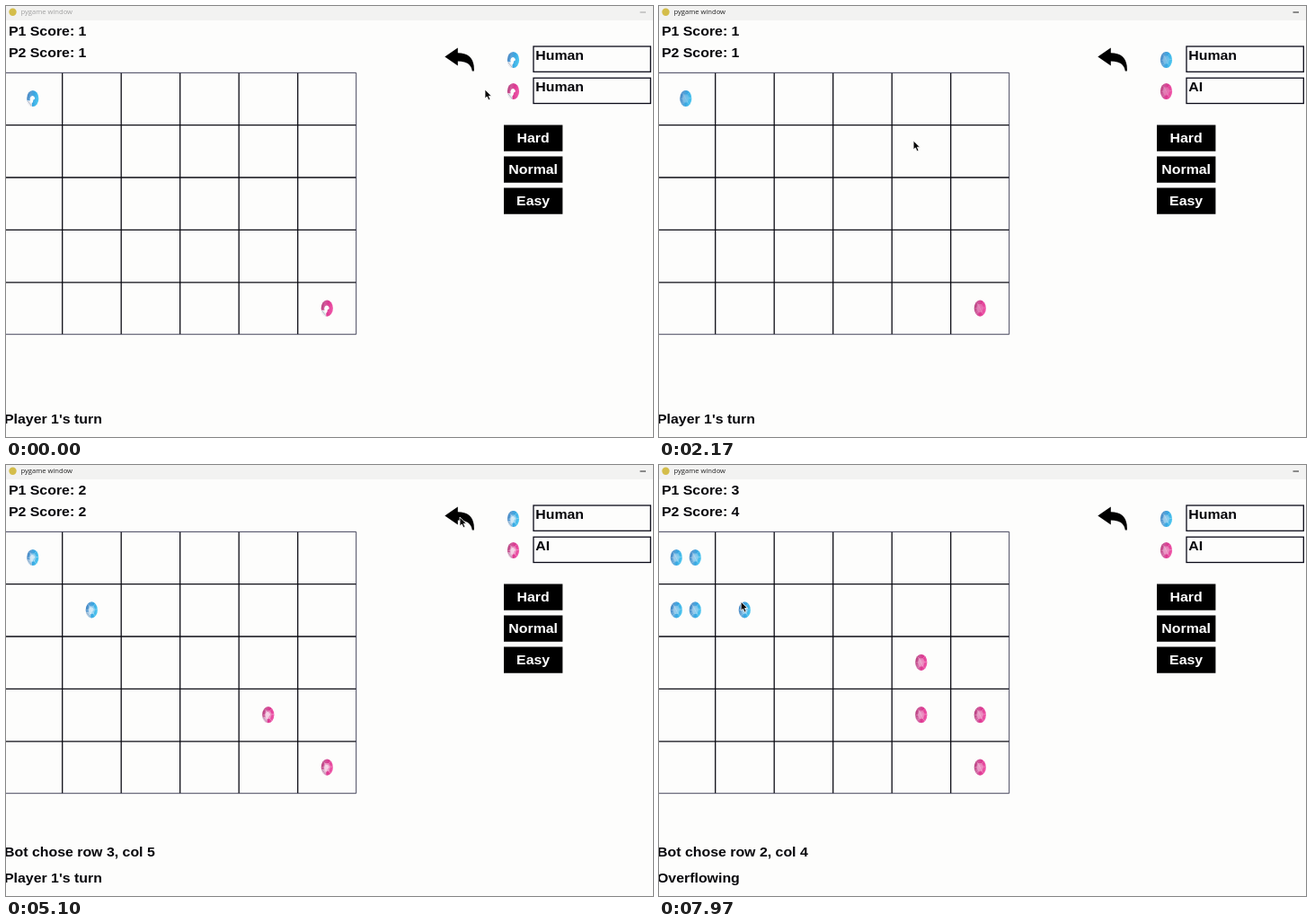
An HTML page that plays this animation: 720x480 px, repeating every 8 s.

```html
<!DOCTYPE html>
<html lang="en">
<head>
<meta charset="utf-8">
<title>Board game</title>
<style>
html, body { margin: 0; width: 100%; height: 100%; overflow: hidden; background: #fdfdfc; }
svg { display: block; width: 720px; height: 480px; }
text { font: bold 14.2px "Liberation Sans", Arial, sans-serif; fill: #08080c; }
.light { fill: #fff; text-anchor: middle; }
.caption { font: 6.8px "Open Sans", "Noto Sans", sans-serif; }
.box { fill: none; stroke: #0a0a18; stroke-width: 1.3; }
</style>
</head>
<body>
<svg viewBox="0 0 720 480">
  <defs>
    <linearGradient id="blueFill" y2=".25">
      <stop offset="0" stop-color="#3a78b8"/><stop offset=".35" stop-color="#569fd6"/>
      <stop offset=".65" stop-color="#36a6e2"/><stop offset="1" stop-color="#4cc4ee"/>
    </linearGradient>
    <linearGradient id="pinkFill" y2=".25">
      <stop offset="0" stop-color="#a8336f"/><stop offset=".35" stop-color="#d0579a"/>
      <stop offset=".65" stop-color="#dc3690"/><stop offset="1" stop-color="#ee56a8"/>
    </linearGradient>
    <g id="facets">
      <path d="M-2.6-4.6H2.2L4-.5 2.2 4.6H-2.2L-4 .2Z" fill="#fff" fill-opacity=".4"/>
      <path d="M-2.6-4.6L-4.4-6.4M2.2-4.6L4-6.6M4-.5H6.4M2.2 4.6L4 6.8M-2.2 4.6L-4.2 6.6M-4 .2H-6.4M-2.6-4.6L2.2 4.6"
        stroke="#fff" stroke-opacity=".45" stroke-width=".7" fill="none"/>
    </g>
    <g id="hollow">
      <path d="M-1 2.2H-6.7A6.7 9.2 0 0 0-1 9.2Z" fill="#eeeef2"/>
      <path d="M-5.4 3L-1.6 8" stroke="#b4bcc8" stroke-width="1"/>
      <path d="M-3.2.2A2.9 4 0 0 1 2.4-.4Q2.6 1.2.6 1.6Q.4 4.6-1 5.4Q-3.2 4-3.2.2Z" fill="#fdfdfd"/>
    </g>
    <g id="blue">
      <ellipse rx="6.6" ry="9.1" fill="url(#blueFill)"/>
      <use href="#facets"/><use href="#hollow"/>
    </g>
    <g id="pink">
      <ellipse rx="6.6" ry="9.1" fill="url(#pinkFill)"/>
      <use href="#facets"/><use href="#hollow"/>
    </g>
  </defs>

  <rect width="720" height="480" fill="#fdfdfc"/>
  <rect width="720" height="16" fill="#f2f2f1"/>
  <circle cx="7.5" cy="6.8" r="4.2" fill="#d4bd4a"/>
  <path id="dash" d="M705.5 7H712" stroke="#333"/>

  <path id="grid" fill="none" stroke="#0c0c14" stroke-width="1.3"/>
  <path d="M-3 74.4H389.7V365.7H-3" fill="none" stroke="#45455c"/>

  <path d="M488.3 56.5L502.8 46.6V52.3C514 52.3 521.8 58 520.8 72.5H518.8C517.6 64.5 512 61.6 502.8 61.6V66.5Z"/>
  <use href="#blue" x="564.5" y="60"/>
  <use href="#pink" x="564.5" y="95"/>
  <rect class="box" x="587" y="45" width="130.3" height="28.3"/>
  <rect class="box" x="587" y="80.2" width="130.3" height="28.3"/>
  <path d="M554 132.6H619.4V161.8H554ZM554 167.6H619.4V196.8H554ZM554 202.6H619.4V231.8H554Z"/>

  <!-- the window is shown wider than its native aspect -->
  <g transform="scale(1.12 1)">
    <text id="caption" class="caption" x="14.7" y="9.5">pygame window</text>
    <text id="score1" x="2.6" y="33.3"></text>
    <text id="score2" x="2.6" y="56.6"></text>
    <text x="526.1" y="60">Human</text>
    <text id="rival" x="526.1" y="95"></text>
    <text class="light" x="523.8" y="152">Hard</text>
    <text class="light" x="523.8" y="187">Normal</text>
    <text class="light" x="523.8" y="222">Easy</text>
    <text id="bot" x="-1.8" y="436.3"></text>
    <text id="turn" x="-1.8" y="465.5"></text>
  </g>

  <g id="gems"></g>
  <path id="cursor" d="M0 0V10L2.3 8 4 11.8 5.9 11 4.3 7.3H7.4Z"
    fill="#080808" stroke="#fff" stroke-width=".8"/>
</svg>
<script>
const LOOP = 8000, TICK = 100 / 3;
const $ = id => document.getElementById(id);

// Each track holds [start time, value]; the value stays until the next start.
const tracks = {
  caption: [[0, '#a0a0a0'], [330, '#222']],
  rival: [[0, 'Human'], [640, 'AI']],
  blue: [[0, '00'], [3090, '00 11'], [4100, '00 11 21'], [5100, '00 11'],
    [6150, '00 10 11'], [7030, '00 10 10 11'], [7700, '00 00 10 10 11']],
  pink: [[0, '45'], [3290, '45 34'], [4195, '45 34 35'], [5100, '45 34'],
    [6400, '45 34 35'], [7270, '45 34 35 24']],
  bot: [[0, ''], [3290, 'Bot chose row 3, col 4'], [4195, 'Bot chose row 3, col 5'],
    [7270, 'Bot chose row 2, col 4']],
  turn: [[0, "Player 1's turn"], [3190, "Player 2's turn"], [3400, "Player 1's turn"],
    [4190, "Player 2's turn"], [4400, "Player 1's turn"], [6260, "Player 2's turn"],
    [6450, "Player 1's turn"], [7100, "Player 2's turn"], [7290, "Player 1's turn"],
    [7790, 'Overflowing']]
};

// Pointer stops: time, x, y
const stops = [
  [0, 533, 93], [300, 630, 94], [400, 630, 94], [560, 632, 118], [660, 632, 118],
  [850, 614, 130], [1150, 590, 146.5], [1720, 590, 146.5], [2500, 92, 152],
  [2750, 84, 150], [3600, 84, 150], [3950, 91, 214], [4600, 91, 214],
  [4950, 505, 58], [5150, 505, 58], [5650, 41, 164.5], [6000, 40.5, 164.5],
  [6600, 38, 170], [7090, 38, 170], [7400, 30, 106], [7700, 30, 106],
  [7960, 91, 152], [8000, 92, 153]
];

// How open the spinning gem looks on each tick of its turn
const spin = [1, 1, 1, .6, .35, .15, 0, 0, .1, .3];

const at = (name, t) => tracks[name].filter(s => s[0] <= t).pop()[1];

function pointer(t) {
  const i = Math.max(1, stops.findIndex(s => s[0] > t));
  const [t0, x0, y0] = stops[i - 1], [t1, x1, y1] = stops[i];
  const k = (t - t0) / (t1 - t0), e = k * k * (3 - 2 * k);
  return [x0 + (x1 - x0) * e, y0 + (y1 - y0) * e];
}

function place(color, cells) {
  const list = cells.split(' ');
  return list.map((cell, i) => {
    const pair = list.filter(c => c === cell).length > 1;
    const side = pair ? (list.indexOf(cell) === i ? -10.5 : 10.5) : 0;
    const x = 29.8 + 65.5 * cell[1] + side, y = 103 + 58.4 * cell[0];
    return `<use href="#${color}" x="${x}" y="${y}"/>`;
  }).join('');
}

const owned = cells => new Set(cells.split(' ')).size;

function setText(id, value) {
  if ($(id).textContent !== value) $(id).textContent = value;
}

let board = '';
function draw(t) {
  const blue = at('blue', t), pink = at('pink', t);
  setText('score1', 'P1 Score: ' + owned(blue));
  setText('score2', 'P2 Score: ' + owned(pink));
  ['rival', 'bot', 'turn'].forEach(id => setText(id, at(id, t)));
  $('caption').style.fill = $('dash').style.stroke = at('caption', t);
  if (board !== blue + '|' + pink) {
    board = blue + '|' + pink;
    $('gems').innerHTML = place('blue', blue) + place('pink', pink);
  }
  // the game blocks briefly after the second bot move
  const live = t > 4430 && t < 4600 ? 4430 : t;
  const open = spin[Math.round(live / TICK) % spin.length];
  $('hollow').setAttribute('opacity', open > .5 ? open : open * .5);
  $('facets').setAttribute('opacity', Math.min(1, .12 + 3.6 * open * (1 - open)));
  const [x, y] = pointer(t);
  $('cursor').setAttribute('transform', `translate(${x.toFixed(1)} ${y.toFixed(1)})`);
}

let lines = '';
for (let c = 1; c < 6; c++) lines += `M${-2.8 + 65.5 * c} 74V366`;
for (let r = 1; r < 5; r++) lines += `M-3 ${74.2 + 58.4 * r}H390`;
$('grid').setAttribute('d', lines);

const start = performance.now();
function frame() {
  draw((performance.now() - start) % LOOP);
  requestAnimationFrame(frame);
}
frame();
</script>
</body>
</html>
```
